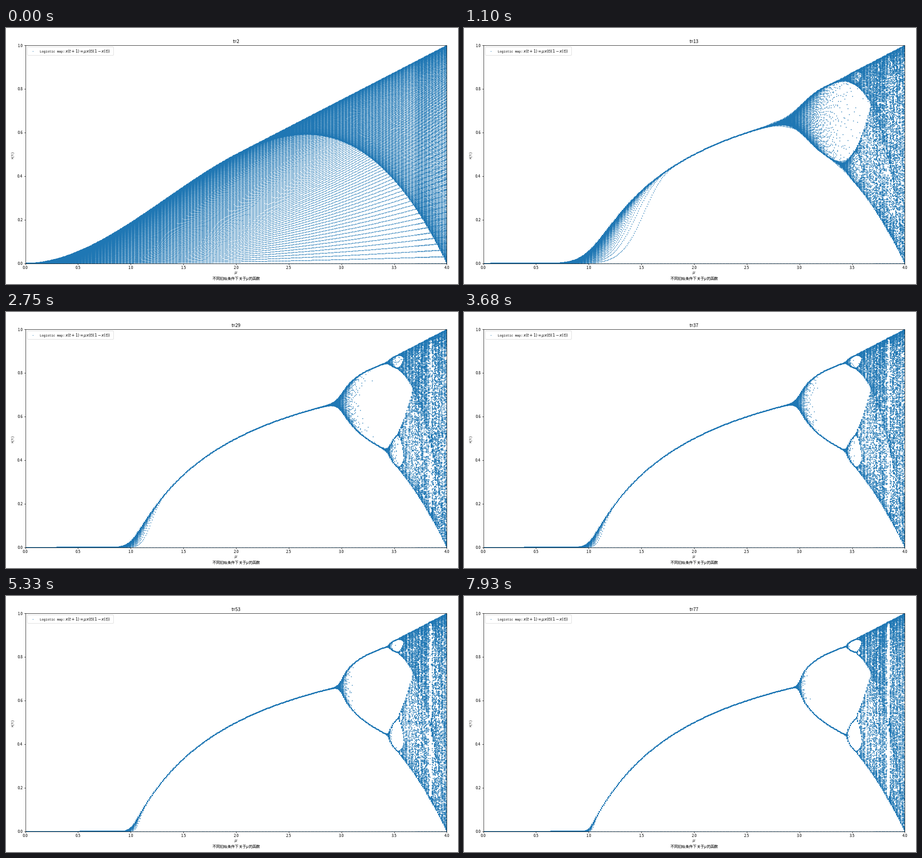
Write a matplotlib script that moves like this. It is 994x563 px and loops after 8000 ms.

```python
import numpy as np
import matplotlib.pyplot as plt
from matplotlib.animation import FuncAnimation
from matplotlib.patches import FancyBboxPatch

W, H, DPI = 994, 563, 64
PT = 72 / DPI                      # points per pixel
LEFT, RIGHT, TOP, BOTTOM = 42.5, 969.5, 38, 517.5
BLUE = "#1f77b4"
CJK, MONO = "Noto Sans CJK JP", "Liberation Mono"

INTERVAL, LOOP = 50, 8000
FIRST, LAST = 2, 77

# How long each iteration stays on screen, 100 ms unless listed
HOLDS = {7: 150, 8: 50, 17: 150, 18: 50, 22: 130, 27: 150, 28: 70, 29: 180,
         36: 150, 37: 50, 46: 200, 55: 150, 56: 50, 59: 200, 64: 150,
         65: 50, 69: 200, 73: 150, 74: 50}
starts = np.cumsum([0] + [HOLDS.get(t, 100) for t in range(FIRST, LAST)])


def dot_area(diameter):
    """Scatter size for a dot of the given diameter in pixels."""
    return (diameter * PT) ** 2


def logistic_orbits():
    """Iterate x -> mu x (1 - x) on a grid of mu and starting values."""
    mu, x = np.meshgrid(np.arange(401) * 0.01, np.arange(501) * 0.002,
                        indexing="ij")
    # Mirrored seeds coincide after one step, except by rounding in chaos
    keep = (x <= 0.5) | (mu > 3.7)
    mu, x = mu[keep], x[keep]
    orbits = [x]
    for _ in range(LAST):
        x = mu * x * (1 - x)
        orbits.append(x)
    return mu, orbits


mu, orbits = logistic_orbits()

fig = plt.figure(figsize=(W / DPI, H / DPI), dpi=DPI, facecolor="white")

ax = fig.add_axes([LEFT / W, 1 - BOTTOM / H,
                   (RIGHT - LEFT) / W, (BOTTOM - TOP) / H])
ax.set(xlim=(0, 4), ylim=(0, 1),
       xticks=np.arange(0, 4.1, 0.5), yticks=np.arange(0, 1.1, 0.2))
ax.xaxis.set_major_formatter("{x:.1f}")
ax.yaxis.set_major_formatter("{x:.1f}")
ax.tick_params(length=2.9 * PT, pad=2.9 * PT, width=0.8 * PT,
               labelsize=8.33 * PT, labelfontfamily=CJK)
for spine in ax.spines.values():
    spine.set_linewidth(0.8 * PT)
dots = ax.scatter(mu, orbits[FIRST], s=dot_area(1.89), c=BLUE, linewidths=0)

# Overlay in pixel coordinates for the labels and the legend
over = fig.add_axes([0, 0, 1, 1], zorder=2)
over.set(xlim=(0, W), ylim=(H, 0))
over.axis("off")


def label(x, y, text, size=8.33, font=CJK, **style):
    return over.text(x, y, text, fontsize=size * PT, family=font,
                     color="black", **style)


title = label(506, 33, "", size=10, ha="center")
label(506, 540.5, r"$\mu$", ha="center")
label(506, 554.2, r"不同初始条件下关于$\mu$的函数", ha="center")
label(15.5, 279, "x(t)", size=7.1, font=MONO, rotation=90,
      ha="center", va="center")

over.add_patch(FancyBboxPatch(
    (47, 41.7), 189.5, 18.5, boxstyle="round,pad=0,rounding_size=1.7",
    facecolor=(1, 1, 1, 0.8), edgecolor=(0.8, 0.8, 0.8, 0.8),
    linewidth=0.83 * PT))
over.scatter([59], [51.3], s=dot_area(1.5), c=BLUE, linewidths=0)
label(74, 53.6, "Logistic map:", size=7.15, font=MONO)
label(130.3, 53.6, r"$x(t+1)=\mu x(t)(1-x(t))$")


def update(i):
    step = np.searchsorted(starts, i * INTERVAL + 30, side="right") - 1
    t = FIRST + int(step)
    dots.set_offsets(np.column_stack([mu, orbits[t]]))
    title.set_text(f"t={t}")
    return dots, title


anim = FuncAnimation(fig, update, frames=LOOP // INTERVAL, interval=INTERVAL,
                     repeat=True, repeat_delay=0)
plt.show()
```
